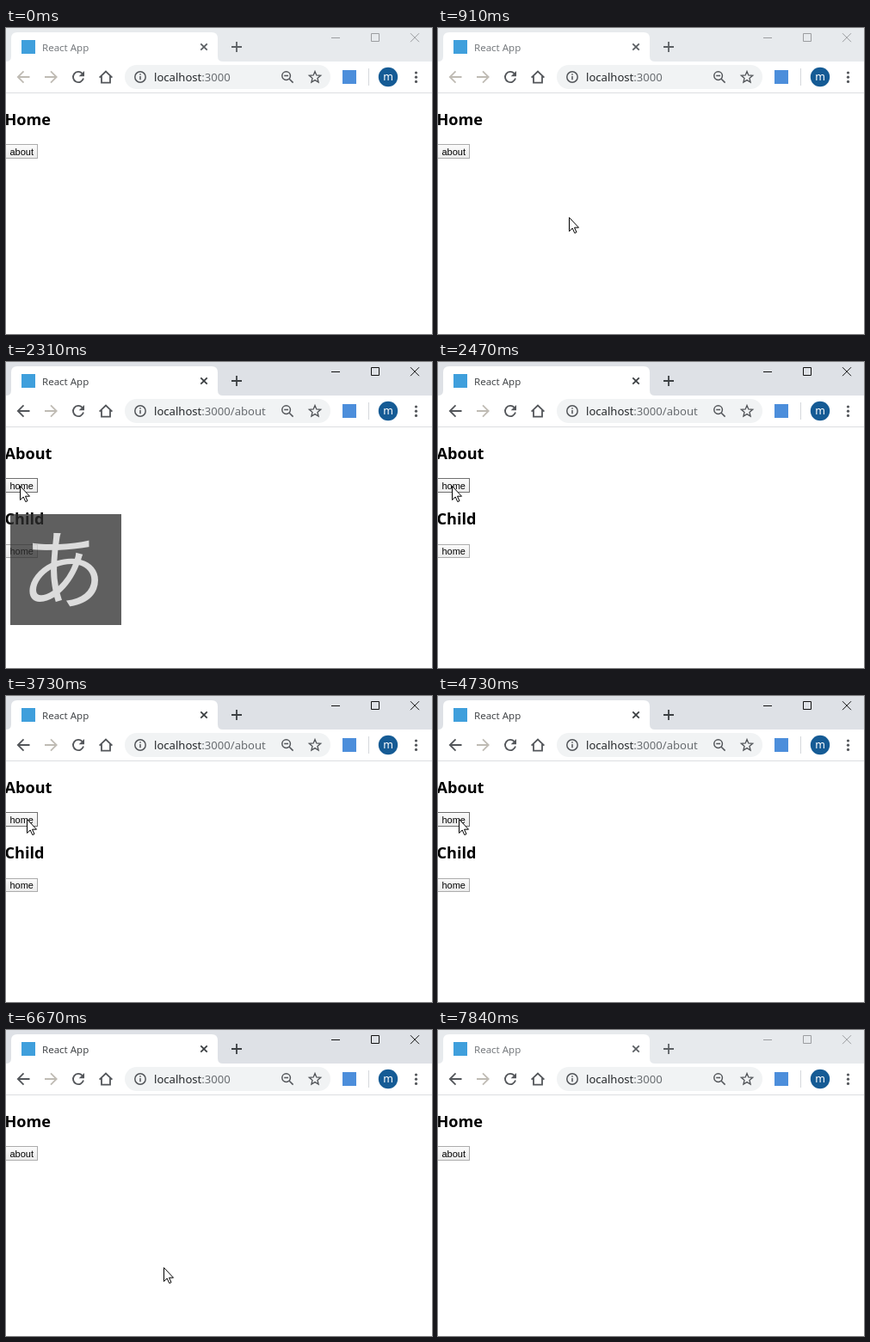
These frames come from a looping animation (495x356 px, 7.92 s). An HTML page:

```html
<!DOCTYPE html>
<html lang="en">
<head>
<meta charset="utf-8">
<title>React App</title>
<style>
  html, body { margin: 0; width: 100%; height: 100%; overflow: hidden; background: #fff; }
  svg { display: block; width: 100%; height: 100%; }
  text { font-family: "Noto Sans", "Open Sans", sans-serif; white-space: pre; }
  .icon { fill: none; stroke: #53565a; stroke-width: 1.8; }
  .thin { fill: none; stroke-width: 1; }
  .head { font-weight: 700; font-size: 18.1px; fill: #000; }
  .btn rect { fill: url(#face); }
  .btn text { font: 11px "Liberation Sans", Arial, sans-serif; text-anchor: middle; fill: #000; }
</style>
</head>
<body>
<svg viewBox="0 0 495 356" xmlns="http://www.w3.org/2000/svg">
  <defs>
    <linearGradient id="face" x2="0" y2="1">
      <stop stop-color="#fbfbfb"/><stop offset="1" stop-color="#ececec"/>
    </linearGradient>
  </defs>
  <rect width="495" height="356" fill="#fff"/>

  <!-- tab strip -->
  <rect id="strip" width="495" height="39"/>
  <path d="M0 39Q6 39 6 33V12Q6 5 13 5H239Q246 5 246 12V33Q246 39 252 39Z" fill="#fff"/>
  <rect x="18" y="14" width="16" height="16" fill="#3f9fdc"/>
  <text id="tab" x="42" y="26.6" font-size="11.5">React App</text>
  <path id="tabIcons" class="icon" d="M226.3 18.3l7.4 7.4m0-7.4l-7.4 7.4M262 22h12m-6-6v12"/>
  <path id="controls" class="thin" d="M378 11.5h10M424.5 6.5h9v9h-9zM470 6.2l10 10m0-10l-10 10"/>

  <!-- toolbar -->
  <path d="M0 75.5H495" stroke="#dcdee1"/>
  <path id="back" class="icon" d="M27.5 57H14m6.5-6.7L13.8 57l6.7 6.7"/>
  <path class="icon" style="stroke:#bfbbb4" d="M45 57h13.5M52 50.3l6.7 6.7-6.7 6.7"/>
  <path class="icon" d="M88.6 52.9A6.1 6.1 0 1 0 90 58.6"/>
  <path d="M91 50v6.3h-6.3z" fill="#53565a"/>
  <path class="icon" d="M108.6 57.6L116 50.5l7.4 7.1M111 56v7.6h10V56"/>
  <rect x="138" y="43" width="239" height="28" rx="14" fill="#f1f3f4"/>
  <g class="icon" style="stroke-width:1.5">
    <circle cx="156" cy="57" r="6.2"/>
    <path d="M156 56v4.3M156 53.2v1.6"/>
    <circle cx="325.6" cy="55.6" r="4.8"/>
    <path d="M329.2 59.2l4.4 4.4M323.2 55.6h4.8"/>
    <path id="star" style="stroke-width:1.3"/>
  </g>
  <text x="172" y="62" font-size="13.1" fill="#25282b">localhost<tspan id="path" fill="#686c70"></tspan></text>
  <rect x="391" y="49" width="16" height="16" fill="#4c8edb"/>
  <path d="M421.5 47v20" stroke="#d5d8dc"/>
  <circle cx="444" cy="57" r="11.2" fill="#155b95"/>
  <text x="444" y="61" font-size="12.5" fill="#fff" text-anchor="middle">m</text>
  <g fill="#53565a">
    <circle cx="476.5" cy="52" r="1.6"/><circle cx="476.5" cy="57.2" r="1.6"/><circle cx="476.5" cy="62.4" r="1.6"/>
  </g>

  <!-- page -->
  <text id="title" class="head" x="-1.5" y="113"></text>
  <g id="main" class="btn">
    <rect x="-2.5" y="135.5" width="39" height="16"/>
    <text x="18.2" y="148"></text>
  </g>
  <g id="child">
    <text class="head" x="-1.5" y="189">Child</text>
    <g id="sub" class="btn">
      <rect x="-2.5" y="212.5" width="39" height="15"/>
      <text x="18.2" y="224">home</text>
    </g>
  </g>

  <g id="ime">
    <rect x="5" y="177" width="129" height="129" fill="#2d2d2d"/>
    <text x="66.5" y="279" text-anchor="middle" fill="#d1d1d1"
      style="font:300 100px 'Noto Sans CJK JP','Noto Sans CJK',sans-serif">あ</text>
  </g>
  <g id="mouse">
    <circle id="press" r="12" fill="#ff0" fill-opacity=".65"/>
    <path d="M.5.5V16.5L4.2 13l2.6 5.6 2.2-1L6.5 12.2H11.5Z" fill="#fff" stroke="#000"/>
  </g>
</svg>
<script>
const LOOP = 7920;
const $ = id => document.getElementById(id);
const set = (el, name, value) => el.setAttribute(name, value);
const show = (el, on) => set(el, 'visibility', on ? 'visible' : 'hidden');
const within = (t, spans) => spans.some(([a, b]) => t >= a && t < b);

const ABOUT = [[1760, 3950], [4730, 5990]];
const PRESS = [[1620, 1760], [3870, 3950], [4570, 4730], [5910, 6050]];

const linear = u => u;
const smooth = u => u * u * (3 - 2 * u);

// Pointer moves: first change, last change, number of steps, end point, easing
const START = [410.5, 375];
const MOVES = [
  [440, 750, 5, [163, 226], linear],
  [910, 1300, 6, [16, 144], smooth],
  [2630, 3020, 6, [18, 221], smooth],
  [3180, 3730, 8, [24, 143], smooth],
  [5030, 5430, 6, [20, 229], smooth],
  [5650, 5650, 1, [20, 227], linear],
  [6360, 7140, 11, [398, 340], smooth],
  [7220, 7220, 1, [409, 350], linear]
];

function pointer(t) {
  let pos = START;
  for (const [t0, t1, n, end, ease] of MOVES) {
    if (t < t0) break;
    const k = n > 1 ? Math.floor((t - t0) / (t1 - t0) * (n - 1) + 0.02) : 0;
    const u = ease(Math.min(1, (k + 1) / n));
    pos = pos.map((p, i) => Math.round(p + (end[i] - p) * u));
  }
  return pos;
}

function imeAlpha(t) {
  if (t < 1760 || t >= 2470) return 0;
  return t < 2310 ? 0.92 : t < 2390 ? 0.757 : 0.38;
}

function drawButton(el, top, bottom, [x, y], visible) {
  const hover = visible && x < 37 && y >= top && y < bottom;
  set(el.querySelector('rect'), 'stroke', hover ? '#707070' : '#acacac');
}

function render(t) {
  const active = t >= 1700 && t < 7840;
  const about = within(t, ABOUT);
  const visible = t >= 440 && t < 7300;
  const pos = pointer(t);

  set($('strip'), 'fill', active ? '#dee1e6' : '#e7eaed');
  set($('tab'), 'fill', active ? '#45484b' : '#777b7f');
  $('tabIcons').style.stroke = active ? '#3c4043' : '#5c6064';
  set($('controls'), 'stroke', active ? '#111' : '#9b9da0');
  $('back').style.stroke = t >= 1760 ? '#53565a' : '#bfbbb4';

  $('path').textContent = about ? ':3000/about' : ':3000';
  $('title').textContent = about ? 'About' : 'Home';
  $('main').querySelector('text').textContent = about ? 'home' : 'about';
  show($('child'), about);
  drawButton($('main'), 135, 152, pos, visible);
  drawButton($('sub'), 212, 228, pos, visible);

  set($('ime'), 'opacity', imeAlpha(t));
  show($('mouse'), visible);
  set($('mouse'), 'transform', `translate(${pos})`);
  set($('press'), 'opacity', within(t, PRESS) ? 1 : 0);
}

const star = Array.from({ length: 10 }, (_, i) => {
  const a = i * Math.PI / 5, r = i % 2 ? 3.1 : 7;
  return [359 + r * Math.sin(a), 57.5 - r * Math.cos(a)].map(v => v.toFixed(2));
});
set($('star'), 'd', 'M' + star.join('L') + 'Z');

const began = performance.now();
function tick() {
  render((performance.now() - began) % LOOP);
  requestAnimationFrame(tick);
}
tick();
</script>
</body>
</html>
```
